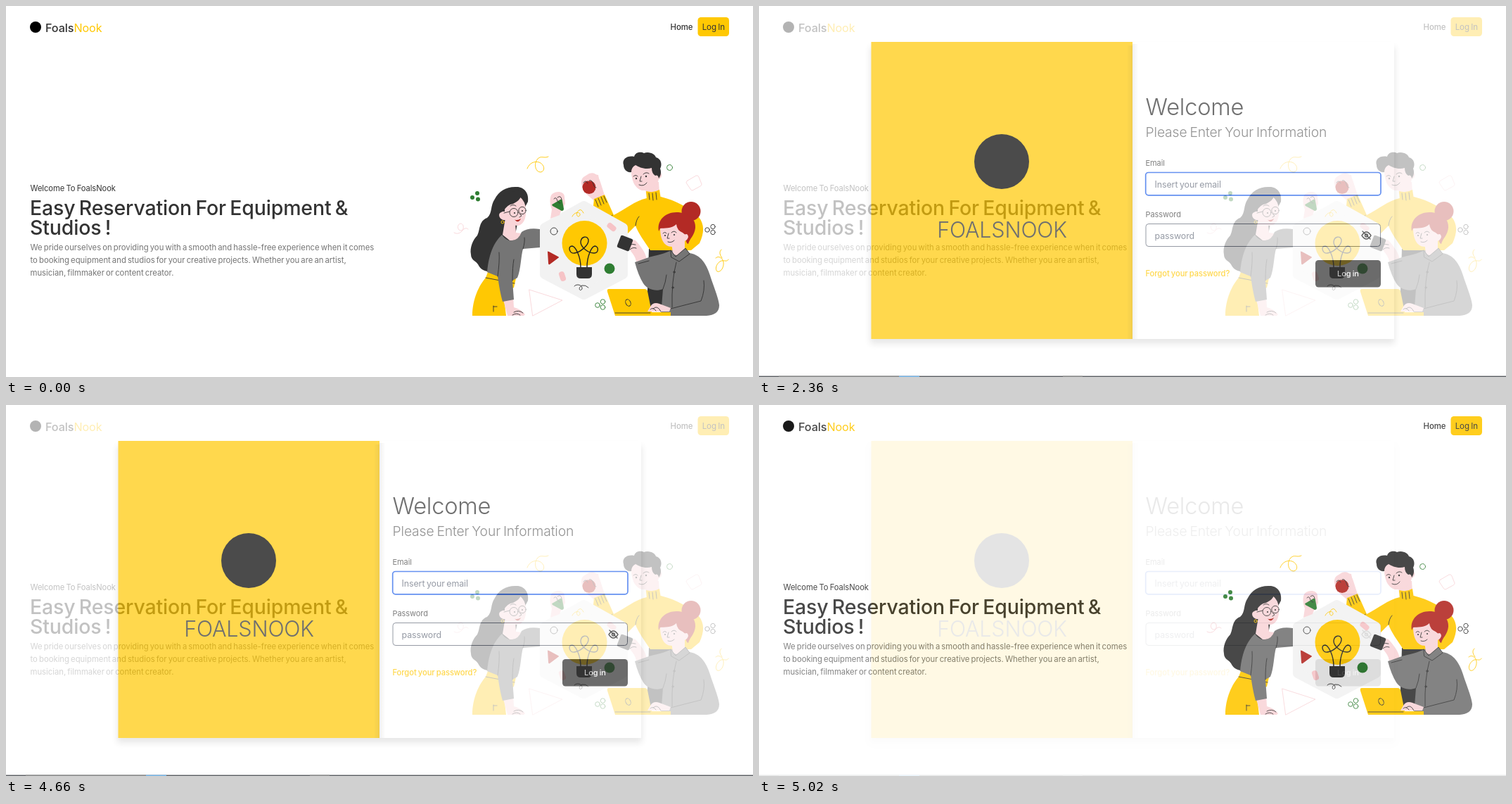
Write an HTML page that moves like this. It is 1062 px wide and 527 px high and loops after 5080 ms.

```html
<!DOCTYPE html>
<html lang="en">
<head>
<meta charset="utf-8">
<title>Reservation</title>
<style>
html, body { margin: 0; width: 100%; height: 100%; overflow: hidden; background: #fff; }
svg { display: block; width: 1062px; height: 527px; }
text { font-family: Inter, "Open Sans", sans-serif; font-optical-sizing: none; letter-spacing: -.006em; word-spacing: -.07em; fill: #333; }
.skin { fill: #f9d5d8; } .dark { fill: #333; } .gray { fill: #757575; }
.gold { fill: #ffc803; } .red { fill: #b32a25; } .green { fill: #2f7d32; }
.line { fill: none; stroke: #333; stroke-width: .9; stroke-linecap: round; stroke-linejoin: round; }
.ink { stroke: #222; stroke-width: 1.4; }
.goldline { stroke: #ffc803; } .pinkline { stroke: #f9d5d8; } .greenline { stroke: #2f7d32; }
.h1 { font-size: 28.5px; font-weight: 500; }
.para { font-size: 11.3px; letter-spacing: 0; word-spacing: -.095em; fill: #757575; }
.label { font-size: 11px; fill: #4b4b4b; }
.hint { font-size: 12.4px; fill: #6b7280; }
.shadow { fill: #000; opacity: .12; filter: blur(4px); }
</style>
</head>
<body>
<svg viewBox="0 0 1062 527">
<defs>
  <linearGradient id="edge"><stop stop-color="#000" stop-opacity=".08"/><stop offset="1" stop-color="#000" stop-opacity="0"/></linearGradient>
</defs>

<g id="home">
  <circle cx="42" cy="30" r="8"/>
  <text x="56" y="36.5" font-size="16.2" font-weight="500">Foals<tspan class="gold" font-weight="400">Nook</tspan></text>
  <text x="944.5" y="34" font-size="11.4" font-weight="500">Home</text>
  <rect class="gold" x="983.5" y="16" width="44.5" height="27" rx="4.5"/>
  <text x="989.7" y="34" font-size="11.5">Log In</text>
  <text x="34.5" y="262.5" font-size="11.2">Welcome To FoalsNook</text>
  <text class="h1" x="34" y="297">Easy Reservation For Equipment &amp;</text>
  <text class="h1" x="34" y="325">Studios !</text>
  <text class="para" x="34.5" y="347">We pride ourselves on providing you with a smooth and hassle-free experience when it comes</text>
  <text class="para" x="34.5" y="365">to booking equipment and studios for your creative projects. Whether you are an artist,</text>
  <text class="para" x="34.5" y="383">musician, filmmaker or content creator.</text>

  <!-- loose ornaments -->
  <path class="line goldline" d="M741 231C744 223 751 220 758 222C766 225 767 235 760 236C752 236 750 223 756 217C761 212 765 217 771 214"/>
  <path class="line goldline" d="M1009 358C1013 354 1019 358 1020 364C1021 371 1016 379 1011 377C1007 373 1011 364 1017 362C1022 361 1025 364 1027 360M1018 358Q1012 350 1017 346"/>
  <path class="line pinkline" d="M637 322C643 326 652 320 650 312C647 305 639 312 644 318C649 322 652 312 657 317"/>
  <path class="line pinkline" d="M744 403L791 418L749 440ZM969 248L981 241Q984 240 985 243L989 253Q989 255 987 256L976 262Q974 262 973 260L967 251Q967 249 969 248Z"/>
  <g class="green"><circle cx="663" cy="272" r="3"/><circle cx="670" cy="266" r="3"/><circle cx="671" cy="274.5" r="3"/></g>
  <g class="line greenline"><circle cx="943.5" cy="229.5" r="4"/><circle cx="841" cy="425" r="3.3"/><circle cx="848.5" cy="420" r="3.3"/><circle cx="848.5" cy="428" r="3.3"/></g>
  <g class="line"><circle cx="997" cy="318" r="3.2"/><circle cx="1005" cy="313.5" r="3.2"/><circle cx="1005" cy="321.5" r="3.2"/></g>

  <!-- standing man -->
  <path class="dark" d="M914 345H962L942 398L935 432L911 432Z"/>
  <path class="skin" d="M839 279L825 267C817 258 816 247 821 243L829 238C837 235 842 240 845 250L852 272Z"/>
  <circle class="red" cx="829" cy="257.5" r="9.5"/>
  <path class="skin" d="M819 249Q824 243 828 249L833 247Q840 252 838 259L846 262L842 240L830 238Z"/>
  <path class="line" d="M821 251Q824 246 827 252M829 248Q833 246 835 253Q836 258 839 258"/>
  <path class="gold" d="M835 284L836 274L851 268L856 279L864 297C882 288 893 277 911 273L931 271C952 276 972 287 985 300C993 310 993 322 986 337L974 347H916C908 335 899 323 895 312L884 323C868 317 849 302 835 284Z"/>
  <path class="line" d="M838 275L842 285M842 273L846 283M846 271L850 281M850 270L854 279M895 312Q896 303 900 299M862 297Q857 303 858 308"/>
  <path class="skin" d="M908 250H928L929 266Q920 272 910 267Z"/>
  <path class="gold" d="M910 263Q920 266 929 261L931 274Q920 281 911 276Z"/>
  <path class="line" d="M914 266L915 275M919 266L920 276M924 265L925 275"/>
  <path class="skin" d="M889 229C888 242 892 259 904 262C917 263 926 256 928 246C934 244 934 234 926 236L922 222H896Z"/>
  <path class="dark" d="M889 236C884 237 878 233 878 226C875 217 884 212 893 214C895 207 903 207 907 209C915 206 923 211 924 215C932 217 933 226 930 231C932 236 931 241 928 245Q927 239 923 241Q918 238 918 230C909 233 900 229 895 226Q889 229 889 236Z"/>
  <path class="line" d="M892 242Q895 239 898 242M906 239Q910 235 914 238M903 242L901 249H904M900 254Q907 257 911 251M925 239Q929 236 929 241"/>
  <circle class="dark" cx="896" cy="245" r="1.2"/><circle class="dark" cx="910" cy="242" r="1.2"/>

  <!-- idea board -->
  <path d="M821.5 284L877 315V381L821.5 410L766 381V315Z" fill="#f2f2f2" stroke="#f2f2f2" stroke-width="14" stroke-linejoin="round"/>
  <circle class="gold" cx="822.5" cy="337" r="32"/>
  <path class="dark" d="M811 371H833V381Q833 387 827 387H817Q811 387 811 381Z"/>
  <path class="line ink" d="M817 371C817 356 810 342 805 341C798 341 801 352 808 351C816 350 829 340 828 332C826 326 818 327 817 335C817 343 828 351 836 351C843 351 843 341 837 341C832 342 826 356 826 371"/>
  <circle class="line" cx="779" cy="320" r="5"/>
  <path class="red" d="M770 349Q769 348 772 349L785 356Q787 357 785 358L773 367Q771 368 771 365Z"/>
  <circle class="green" cx="858" cy="373" r="7.5"/>
  <g fill="#f6c3c6"><rect x="787" y="377" width="8" height="14" rx="3.5" transform="rotate(-18 791 384)"/><rect x="857" y="307" width="8" height="14" rx="3.5" transform="rotate(-50 861 314)"/></g>
  <path class="line goldline" d="M805 299C808 292 817 292 816 297C813 303 808 294 815 290Q818 288 821 294"/>
  <path class="line" d="M808 398C811 394 820 396 819 402C815 407 813 399 819 397Q824 396 828 400"/>

  <!-- left woman -->
  <path class="skin" d="M774 302L776 289C772 279 773 268 778 266C784 262 794 264 794 271L795 281L788 294L787 297Z"/>
  <path class="green" d="M777 284Q775 282 778 281L788 275Q791 274 791 277L793 288Q793 291 790 291Z"/>
  <path class="line" d="M779 274Q782 270 784 277Q786 281 788 280M784 272Q789 268 790 275"/>
  <path class="dark" d="M742 278C744 263 734 256 724 257C710 257 700 264 695 274C688 284 692 294 684 301C672 305 674 319 670 326C664 332 659 343 661 353C661 361 668 362 671 367C677 379 689 379 700 374L722 335L728 304Z"/>
  <path class="skin" d="M710 301L724 308L725 322L733 323Q727 335 716 333L706 325Z"/>
  <path class="skin" d="M709 292C709 280 720 274 729 270Q739 277 739 290C740 302 735 311 728 312C719 312 713 309 710 304C702 305 698 295 704 293Q707 291 709 292Z"/>
  <path class="dark" d="M707 292Q712 282 721 281Q731 276 732 270L741 279Q742 263 727 261L706 270Z"/>
  <g class="line"><circle cx="722" cy="293.5" r="6"/><circle cx="734" cy="290.5" r="5.2"/><path d="M716 292L708 294M730 295L733 298L730 300M717 284Q721 281 725 284"/></g>
  <circle class="dark" cx="723" cy="294" r="1.1"/><circle class="dark" cx="734" cy="291" r="1.1"/>
  <path class="red" d="M723 303.5Q728 305 732 302Q730 307 726 306Z"/>
  <circle class="line goldline" cx="706" cy="307" r="2"/>
  <path class="gold" d="M685 378L725 387L722 400L707 406L711 440H663C663 416 673 396 682 386Z"/>
  <path class="line" d="M682 386L723 394M693 426V434M693 427H698"/>
  <path class="skin" d="M706 414L721 412L722 428Q731 430 738 438L736 440H713Z"/>
  <path class="line" d="M722 435Q729 431 735 436M720 439Q726 435 731 439"/>
  <path class="gray" d="M705 325C696 334 687 347 684 378L699 384C701 398 703 409 706 420L722 417L720 390L727 386C732 374 732 355 735 345L759 343V317C747 315 739 317 733 321Q728 335 715 333Q709 331 705 325Z"/>
  <path class="line" d="M699 384Q702 363 701 350M720 390Q720 370 722 360M735 345Q738 335 737 329"/>

  <!-- seated woman -->
  <circle class="red" cx="974" cy="291.5" r="13.5"/>
  <path class="skin" d="M896 363C894 351 884 347 884 338Q887 330 895 333C902 341 909 349 911 360Z"/>
  <path class="dark" d="M877 326L890 331Q892 332 891 334L886 347Q885 349 883 348L870 343Q868 342 869 340L874 327Q875 325 877 326Z"/>
  <path class="line" d="M886 340Q890 337 895 339M887 346Q891 342 896 344"/>
  <path class="gray" d="M894 364L911 358C918 355 932 354 946 347L972 351C991 354 998 372 1003 389C1009 406 1013 416 1014 425C1014 435 1007 439 996 440H931L934 402C924 406 912 403 906 394Q899 383 894 364Z"/>
  <path class="skin" d="M946 335L965 332L965 347Q957 358 948 352Z"/>
  <path class="line" style="fill:#757575" d="M945 347L952 356L966 344L972 352L957 363L946 357Z"/>
  <path class="skin" d="M930 315C930 329 934 342 947 342C961 341 968 334 969 324L964 303H935Z"/>
  <path class="red" d="M928 320C925 304 938 293 953 293C970 293 981 302 980 315C979 326 972 330 970 338Q965 336 967 326L962 322Q954 319 953 310C946 317 935 315 930 316Z"/>
  <path class="skin" d="M963 326Q969 321 970 328Q968 335 963 333Z"/>
  <path class="line" d="M934 323Q937 320 939 323M946 322Q950 318 953 322M942 323L940 330H943M941 335Q946 337 950 333"/>
  <circle class="dark" cx="937" cy="326" r="1.1"/><circle class="dark" cx="950" cy="325" r="1.1"/>
  <path class="line" d="M934 402Q938 392 939 382M953 364Q946 390 947 428M992 390Q994 404 988 419Q968 424 945 430M899 366L914 362"/>
  <g class="line"><circle cx="950" cy="378" r="1.2"/><circle cx="948" cy="400" r="1.2"/></g>

  <!-- laptop -->
  <path class="gold" d="M857 402H908Q911 402 912 405L918 435H945V440H866L855 406Q854 402 857 402Z"/>
  <path class="skin" d="M945 429L929 423Q920 420 916 427L912 434H943Z"/>
  <path class="line" d="M866 436H916M920 430Q926 424 931 434M916 431Q920 427 924 433"/>
  <ellipse class="line" cx="884.5" cy="421.5" rx="3.4" ry="5" transform="rotate(-25 884.5 421.5)"/>
</g>

<g id="login">
  <rect width="1062" height="527" fill="#fff"/>
  <rect class="shadow" x="158" y="58" width="746" height="422" rx="4"/>
  <rect class="gold" x="159.5" y="51" width="371.5" height="422"/>
  <rect x="531" y="51" width="372" height="422" fill="#fff"/>
  <rect x="531" y="54" width="8" height="419" fill="url(#edge)"/>
  <rect x="523" y="56" width="8" height="417" fill="url(#edge)" transform="rotate(180 527 264.5)"/>
  <circle cx="345" cy="221" r="39"/>
  <text x="345.5" y="329" font-size="30.5" font-weight="300" text-anchor="middle">FOALSNOOK</text>
  <text x="549.5" y="155" font-size="32.6" font-weight="300">Welcome</text>
  <text x="549.5" y="186" font-size="19.3" font-weight="300" style="fill:#666">Please Enter Your Information</text>
  <text class="label" x="549.5" y="227">Email</text>
  <rect x="549.7" y="236.5" width="334.3" height="32.3" rx="4" fill="#fff" stroke="#2563eb" stroke-width="1.7"/>
  <text class="hint" x="562.5" y="257.5">Insert your email</text>
  <text class="label" x="549.5" y="300">Password</text>
  <rect x="550" y="309.5" width="333.5" height="32" rx="4" fill="#fff" stroke="#6b7280"/>
  <text class="hint" x="562.5" y="330.5">password</text>
  <g class="line ink"><path d="M857 326Q863.5 316 870 326Q863.5 336 857 326Z"/><circle cx="863.5" cy="326" r="2"/><path d="M858 320L869 331"/></g>
  <text class="gold" x="549.5" y="384" font-size="11.2" font-weight="500">Forgot your password?</text>
  <rect class="dark" x="791" y="361" width="93" height="38.5" rx="4.5"/>
  <text x="837.5" y="384" font-size="11" font-weight="500" text-anchor="middle" style="fill:#fff">Log in</text>
  <path d="M0 525.5H1062V527H0Z" fill="#20252b"/>
  <path d="M28 525.5H199V527H28ZM432 525.5H460V527H432Z" fill="#666"/>
  <path d="M199 525.5H228V527H199Z" fill="#4aa3e8"/>
</g>
</svg>
<script>
const LOOP = 5080, HOLD = 2000, STEP = 60, HALF = 2540;
const login = document.getElementById("login");
const start = performance.now();

// Each half holds one page, then cross-fades in nine steps of a tenth.
function fade(t) {
  const local = t % HALF;
  const mix = local < HOLD ? 0 : (Math.floor((local - HOLD) / STEP) + 1) / 10;
  return t < HALF ? mix : 1 - mix;
}

function draw() {
  login.setAttribute("opacity", fade((performance.now() - start) % LOOP));
  requestAnimationFrame(draw);
}
draw();
</script>
</body>
</html>
```
